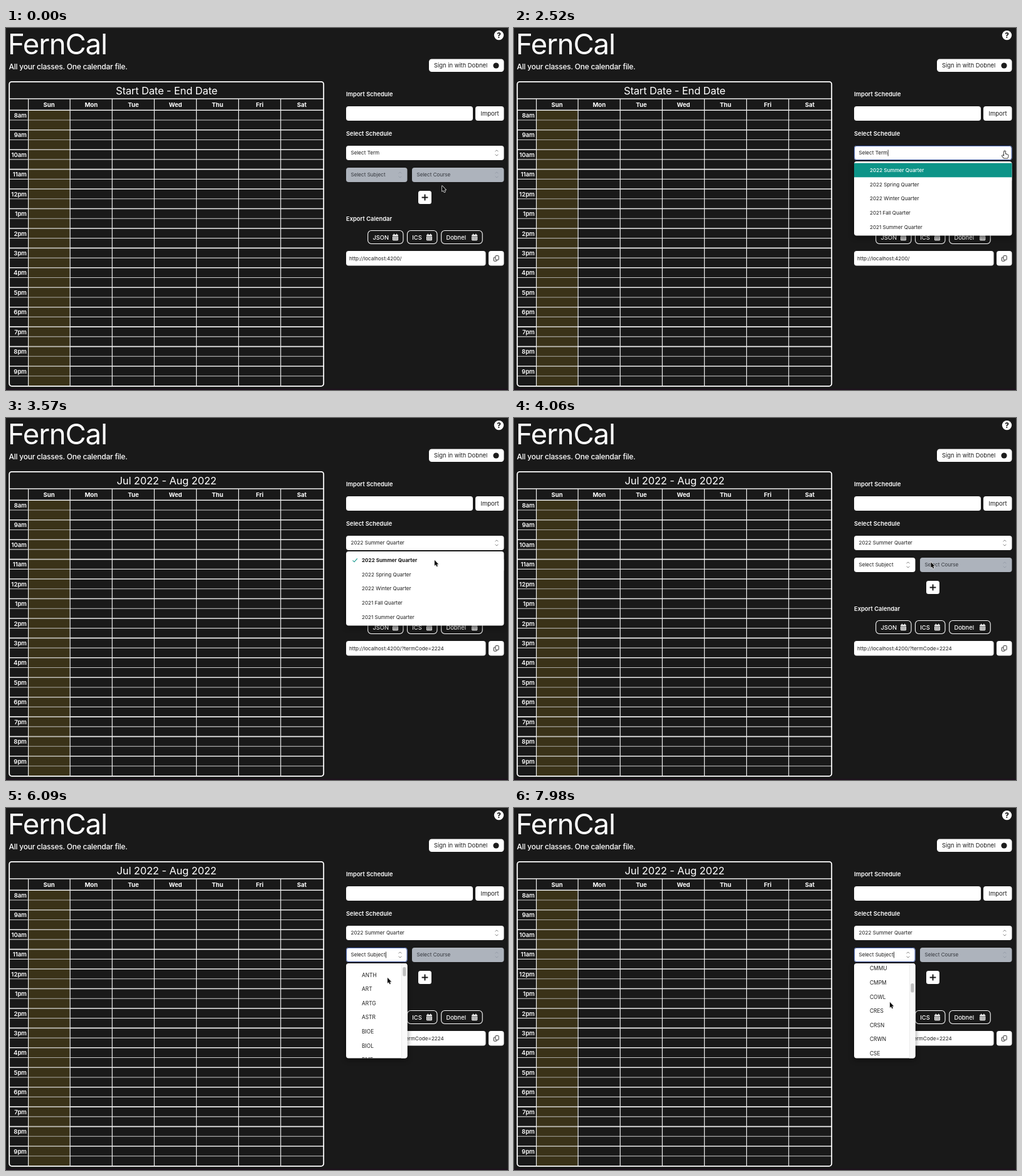
Write an HTML page with a canvas that moves like this. It is 800x578 px and loops after 8000 ms.

```html
<!DOCTYPE html>
<html lang="en">
<head>
<meta charset="utf-8">
<title>FernCal</title>
<style>
  html, body { margin: 0; width: 100%; height: 100%; overflow: hidden; background: #191919; }
  canvas { display: block; width: 800px; height: 578px; }
</style>
</head>
<body>
<canvas id="stage"></canvas>
<script>
const W = 800, H = 578, LOOP = 8000, STEP = 70;
const BG = '#191919', INK = '#1c1c1c', TEAL = '#0d9488', MUTED = '#adb3bc';
const TERM_OPEN = 2450, TERM_PICK = 3570, SUBJECT_OPEN = 4690;

const TERMS = ['2022 Summer', '2022 Spring', '2022 Winter', '2021 Fall', '2021 Summer'].map(s => s + ' Quarter');
const SUBJECTS = ('ACEN AM ANTH ART ARTG ASTR BIOE BIOL BME CHEM CHIN CLNI CLTE ' +
  'CMMU CMPM COWL CRES CRSN CRWN CSE DANM').split(' ');
const DAYS = ['Sun', 'Mon', 'Tue', 'Wed', 'Thu', 'Fri', 'Sat'];
const ITEM = 22.62;

// [time, x, y] of the pointer tip and [time, offset] of the subject list
const POINTER = [
  [0, 695, 252], [1190, 785, 199], [1400, 785, 199], [1820, 782, 197], [2590, 782, 197],
  [3430, 683, 227], [3780, 683, 227], [4480, 630, 236], [5110, 630, 236],
  [5670, 608, 271], [6720, 608, 271], [7420, 599, 310]
];
const SCROLL = [[5740, 0], [6090, 41], [6580, 112], [6650, 112], [7420, 280], [7910, 300]];

const canvas = document.getElementById('stage');
const c = canvas.getContext('2d');
const dpr = window.devicePixelRatio || 1;
canvas.width = W * dpr;
canvas.height = H * dpr;

function track(keys, t, ease) {
  if (t <= keys[0][0]) return keys[0].slice(1);
  for (let i = 1; i < keys.length; i++) {
    const a = keys[i - 1], b = keys[i];
    if (t < b[0]) {
      const k = ease((t - a[0]) / (b[0] - a[0]));
      return a.slice(1).map((v, j) => v + (b[j + 1] - v) * k);
    }
  }
  return keys[keys.length - 1].slice(1);
}
const smooth = k => k * k * (3 - 2 * k);
const linear = k => k;

function text(s, x, y, size, color = INK, weight = 400, align = 'left', spacing = 0) {
  c.font = `${weight} ${size}px Inter, "Open Sans", sans-serif`;
  c.letterSpacing = spacing + 'px';
  c.textAlign = align;
  c.textBaseline = 'alphabetic';
  c.fillStyle = color;
  c.fillText(s, x, y + size * 0.36);
}

function box(x, y, w, h, r, fill) {
  c.beginPath();
  c.roundRect(x, y, w, h, r);
  c.fillStyle = fill;
  c.fill();
}

function outline(x, y, w, h, r, color, width) {
  c.beginPath();
  c.roundRect(x, y, w, h, r);
  c.strokeStyle = color;
  c.lineWidth = width;
  c.stroke();
}

function rect(x, y, w, h, color) {
  c.fillStyle = color;
  c.fillRect(x, y, w, h);
}

function line(points, color, width) {
  c.beginPath();
  points.forEach(([x, y]) => c.lineTo(x, y));
  c.strokeStyle = color;
  c.lineWidth = width;
  c.stroke();
}

function chevrons(x, y, color) {
  line([[x - 2.4, y - 2.2], [x, y - 4.6], [x + 2.4, y - 2.2]], color, 0.9);
  line([[x - 2.4, y + 2.2], [x, y + 4.6], [x + 2.4, y + 2.2]], color, 0.9);
}

function field(x, y, w, label, { disabled, focusedAt, t }) {
  const focused = focusedAt !== undefined;
  box(x, y, w, 23, 4, disabled ? MUTED : '#fff');
  if (focused) outline(x + 0.4, y + 0.4, w - 0.8, 22.2, 3.6, '#24449c', 0.9);
  text(label, x + 7.5, y + 11.5, 8.1, disabled ? '#33363c' : INK);
  if (focused && Math.floor((t - focusedAt) / 500) % 2 === 0) {
    rect(x + 8 + c.measureText(label).width, y + 6.5, 0.8, 10, '#111');
  }
  chevrons(x + w - 11.5, y + 11.5, disabled ? '#949aa6' : '#777');
}

function calendar(title) {
  const left = 35.6, top = 131.3, col = 67.12, half = 15.72, bottom = 571;
  rect(36, 132, 65.5, bottom - 132, '#3a3318');
  for (let i = 0; i < 28; i++) {
    const y = top + i * half, hour = i % 2 === 0;
    line([[6, y], [506, y]], hour ? '#f0f0f0' : '#d0d0d0', hour ? 1.6 : 1.1);
    if (hour) {
      const h = 8 + i / 2;
      text((h > 12 ? h - 12 : h) + (h < 12 ? 'am' : 'pm'), 33, y + 8.2, 9.6, '#fff', 600, 'right');
    }
  }
  rect(36, 132, 65.5, bottom - 132, 'rgba(58,51,24,.25)');
  line([[6, 113], [506, 113]], '#f0f0f0', 1.3);
  for (let i = 0; i < 7; i++) {
    const x = left + i * col - (i ? 0.6 : 0);
    line([[x, 113], [x, bottom]], '#f0f0f0', 1.2);
    text(DAYS[i], left + (i + 0.5) * col - 0.5, 122.3, 9.6, '#fff', 700, 'center');
  }
  outline(5.2, 85.8, 501, 486, 4, '#fff', 1.8);
  text(title, 256, 100, 16.5, '#fff', 400, 'center', -0.15);
}

function calendarIcon(x, y) {
  box(x - 4.5, y - 4, 9, 9.2, 1.2, '#fff');
  rect(x - 2.7, y - 5.4, 1.2, 2, '#fff');
  rect(x + 1.5, y - 5.4, 1.2, 2, '#fff');
  rect(x - 4.5, y - 1.9, 9, 0.7, BG);
  for (let i = 0; i < 6; i++) {
    rect(x - 3.2 + (i % 3) * 2.5, y - 0.1 + (i > 2 ? 2.5 : 0), 1.4, 1.4, BG);
  }
}

function exportButton(x, w, label) {
  outline(x, 323.5, w, 21, 5.5, '#fff', 1.1);
  text(label, x + 7.7, 334.2, 9.4, '#fff', 500);
  calendarIcon(x + w - 12.5, 334);
}

function header() {
  text('FernCal', 3, 25.5, 45.5, '#fff', 400, 'left', -1.2);
  text('All your classes. One calendar file.', 4.5, 61.2, 12, '#fff', 500, 'left', -0.25);
  c.beginPath();
  c.arc(785.5, 11.6, 7.7, 0, 7);
  c.fillStyle = '#fff';
  c.fill();
  text('?', 785.5, 11.8, 11.5, INK, 800, 'center');
  box(674, 49.5, 119.5, 20.5, 4.5, '#fff');
  text('Sign in with Dobnel', 682, 60, 9.4);
  c.beginPath();
  c.arc(781, 60, 4.6, 0, 7);
  c.fillStyle = INK;
  c.fill();
}

function sidebar(t) {
  const picked = t >= TERM_PICK;
  text('Import Schedule', 542, 105.2, 9.4, '#fff', 600);
  box(542, 125, 202, 23, 4, '#fff');
  box(748, 125, 45.5, 23, 4, '#fff');
  text('Import', 771, 136.7, 9.5, INK, 400, 'center');
  text('Select Schedule', 542, 168.3, 9.4, '#fff', 600);
  field(542, 188, 251.5, picked ? TERMS[0] : 'Select Term',
    { t, focusedAt: t >= TERM_OPEN && !picked ? TERM_OPEN : undefined });
  field(542, 223, 97.5, 'Select Subject',
    { t, disabled: !picked, focusedAt: t >= SUBJECT_OPEN ? SUBJECT_OPEN : undefined });
  field(647, 223, 146.5, 'Select Course', { t, disabled: true });

  box(657, 260, 21, 21, 3.5, '#fff');
  rect(662.6, 269.6, 9.8, 1.9, '#111');
  rect(666.6, 265.6, 1.9, 9.8, '#111');

  text('Export Calendar', 542, 304.2, 9.4, '#fff', 600);
  exportButton(576.7, 56.3, 'JSON');
  exportButton(639.5, 47.5, 'ICS');
  exportButton(693.7, 65.5, 'Dobnel');

  box(542, 356, 222.5, 23.5, 4, '#fff');
  text('http://localhost:4200/' + (picked ? '?termCode=2224' : ''), 547, 367.8, 8.1);
  box(769, 356, 24.5, 23.5, 4, '#fff');
  outline(777.2, 366.2, 5, 6, 0.9, INK, 0.9);
  box(779.6, 363.4, 5.8, 7, 0.9, '#fff');
  outline(780, 363.6, 5.2, 6.6, 0.9, INK, 0.9);
}

function panel(x, y, w, h) {
  c.save();
  c.shadowColor = 'rgba(0,0,0,.45)';
  c.shadowBlur = 8;
  c.shadowOffsetY = 3;
  box(x, y, w, h, 4, '#fff');
  c.restore();
}

function termList(t) {
  const alpha = t < TERM_OPEN ? 0 : 1 - Math.max(0, (t - TERM_PICK) / 140);
  if (alpha <= 0) return;
  const picked = t >= TERM_PICK;
  c.globalAlpha = alpha;
  panel(542, 213, 251.5, 118.5);
  if (!picked) rect(542, 215.7, 251.5, ITEM, TEAL);
  TERMS.forEach((s, i) => {
    const first = i === 0;
    text(s, 567, 227.2 + i * ITEM, 8.1, first && !picked ? '#fff' : INK, first ? (picked ? 700 : 500) : 400);
  });
  if (picked) line([[552.5, 227.3], [555, 229.8], [559.8, 224.4]], TEAL, 1.1);
  c.globalAlpha = 1;
}

function subjectList(t) {
  if (t < SUBJECT_OPEN) return;
  const [offset] = track(SCROLL, t, linear);
  panel(542, 248, 97.5, 151.5);
  c.save();
  c.beginPath();
  c.roundRect(542, 248, 97.5, 151.5, 4);
  c.clip();
  if (offset === 0) rect(542, 250.6, 88, ITEM, TEAL);
  SUBJECTS.forEach((s, i) => {
    const y = 262.3 + i * ITEM - offset, active = i === 0 && offset === 0;
    if (y > 238 && y < 410) text(s, 567, y, 8.4, active ? '#fff' : INK, active ? 500 : 400);
  });
  rect(630, 248, 10, 152, '#fafafa');
  rect(630, 248, 0.7, 152, '#e6e6e6');
  box(632.3, 250 + offset * 0.1, 5.2, 14.5, 2.6, '#c0c0c0');
  c.restore();
}

function shape(d, x, y, fill, stroke) {
  const p = new Path2D(d);
  c.save();
  c.translate(x, y);
  c.lineJoin = 'round';
  c.lineWidth = 1.5;
  c.strokeStyle = stroke;
  c.stroke(p);
  c.fillStyle = fill;
  c.fill(p);
  c.restore();
}

function pointer(t) {
  const [x, y] = track(POINTER, t, smooth);
  const onTerm = t > 1300 && t < TERM_PICK && x > 774 && y < 212;
  const onSubject = t > TERM_PICK && x > 620 && x < 639 && y < 246;
  if (onTerm || onSubject) {
    shape('M-1 1Q0-.4 1 1V4.6Q2.2 3.8 2.8 5Q4 4.4 4.4 5.6Q5.6 5.4 5.6 6.6V8L4.4 10.8H-1.2L-4 7.6Q-4.4 6-2.6 6.4L-1 7.6Z',
      x, y, '#fff', '#111');
  } else {
    shape('M0 0V8.8L2 7L3.4 10.2L4.9 9.6L3.5 6.4H6.2Z', x, y, '#0c0c0c', '#e8e8e8');
  }
}

function draw(now) {
  const t = Math.floor(now % LOOP / STEP) * STEP;
  c.setTransform(dpr, 0, 0, dpr, 0, 0);
  rect(0, 0, W, H, BG);
  rect(0, 576, W, 2, '#1d111c');
  header();
  calendar(t >= TERM_PICK ? 'Jul 2022 - Aug 2022' : 'Start Date - End Date');
  sidebar(t);
  termList(t);
  subjectList(t);
  pointer(t);
}

const start = performance.now();
function frame() {
  draw(performance.now() - start);
  requestAnimationFrame(frame);
}
frame();
</script>
</body>
</html>
```
